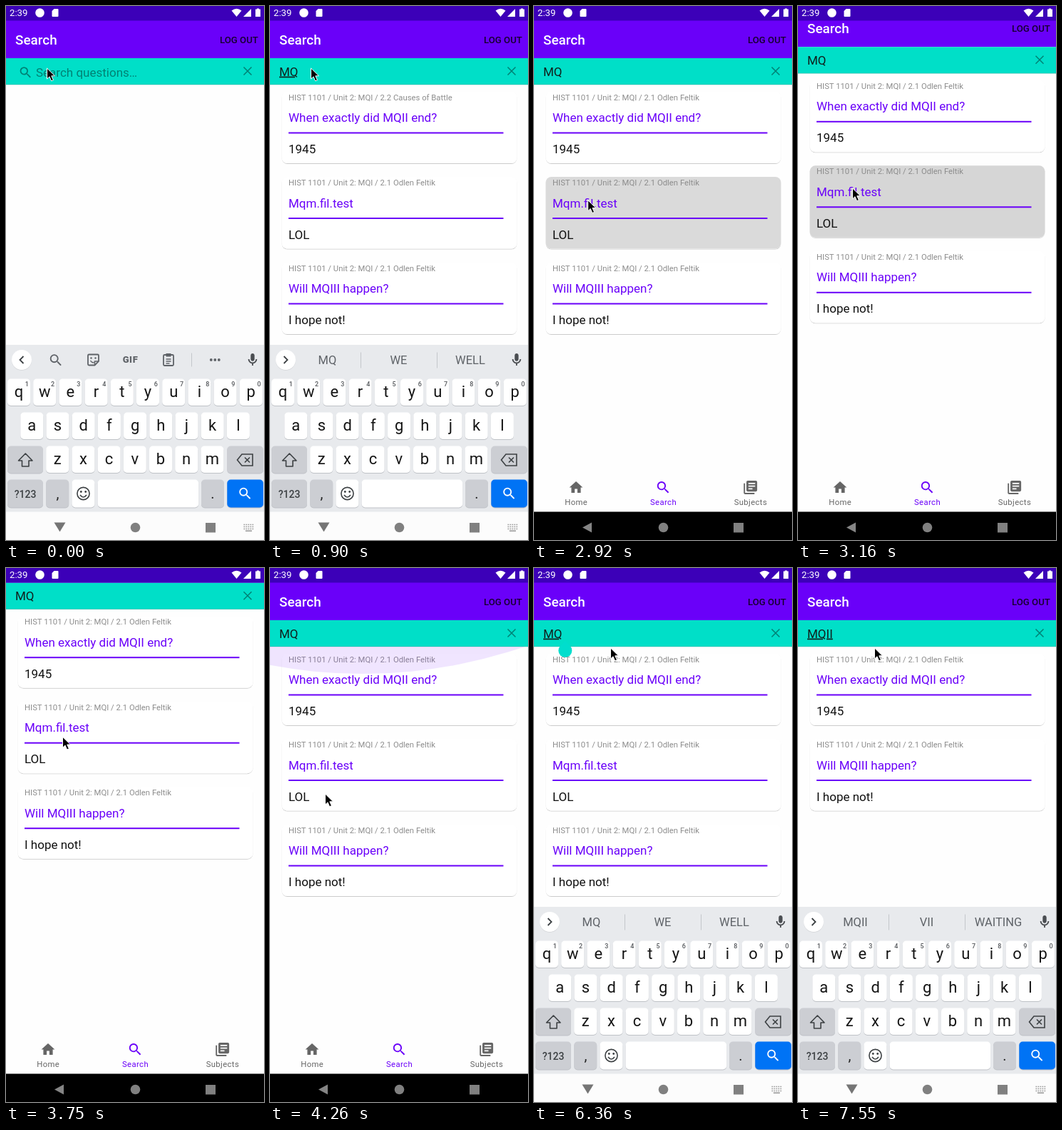
Animation of 362 by 747 pixels, one loop 8 s. Source, as an HTML page:

```html
<!DOCTYPE html>
<html lang="en">
<head>
<meta charset="utf-8">
<title>Question search</title>
<style>
  html, body { margin: 0; width: 100%; height: 100%; overflow: hidden; background: #fefefe; }
  svg { display: block; width: 362px; height: 747px; }
  text { font-family: Roboto, Arial, sans-serif; white-space: pre; }
</style>
</head>
<body>
<svg id="stage" viewBox="0 0 362 747" xmlns="http://www.w3.org/2000/svg"></svg>
<script>
const LOOP = 8000;
const PURPLE = '#6a00f9', TEAL = '#00dfc8', GREY = '#5f6368';

const PATHS = {
  search: 'M15.5 14h-.79l-.28-.27A6.47 6.47 0 0 0 16 9.5 6.5 6.5 0 1 0 9.5 16c1.61 0 3.09-.59 4.23-1.57l.27.28v.79l5 4.99L20.49 19l-4.99-5zm-6 0C7.01 14 5 11.99 5 9.5S7.01 5 9.5 5 14 7.01 14 9.5 11.99 14 9.5 14z',
  home: 'M10 20v-6h4v6h5v-8h3L12 3 2 12h3v8z',
  books: 'M4 6H2v14c0 1.1.9 2 2 2h14v-2H4V6zm16-4H8c-1.1 0-2 .9-2 2v12c0 1.1.9 2 2 2h12c1.1 0 2-.9 2-2V4c0-1.1-.9-2-2-2zm-1 9H9V9h10v2zm-4 4H9v-2h6v2zm4-8H9V5h10v2z',
  mic: 'M12 14c1.66 0 3-1.34 3-3V5c0-1.66-1.34-3-3-3S9 3.34 9 5v6c0 1.66 1.34 3 3 3zm5-3c0 2.76-2.24 5-5 5s-5-2.24-5-5H5c0 3.53 2.61 6.43 6 6.92V21h2v-3.08c3.39-.49 6-3.39 6-6.92h-2z'
};

// markup helpers
const text = (s, x, y, size, fill, extra = '') =>
  `<text x="${x}" y="${y}" font-size="${size}" fill="${fill}" ${extra}>${s}</text>`;
const mid = 'text-anchor="middle"';
const rect = (x, y, w, h, fill, extra = '') =>
  `<rect x="${x}" y="${y}" width="${w}" height="${h}" fill="${fill}" ${extra}/>`;
const disc = (x, y, r, fill, extra = '') => `<circle cx="${x}" cy="${y}" r="${r}" fill="${fill}" ${extra}/>`;
const path = (d, fill, extra = '') => `<path d="${d}" fill="${fill}" ${extra}/>`;
const line = (d, color, w) => path(d, 'none', `stroke="${color}" stroke-width="${w}"`);
const icon = (name, x, y, size, fill) =>
  path(PATHS[name], fill, `transform="translate(${x - size / 2} ${y - size / 2}) scale(${size / 24})"`);
const group = (id, body, extra = '') => `<g id="${id}" ${extra}>${body}</g>`;

const card = i => {
  const top = 119.5 + 119.5 * i;
  return group('card' + i,
    rect(16.5, top, 330, 100.5, '#fff', 'rx="8" filter="url(#lift)"') +
    rect(16.5, top, 330, 100.5, '#d6d6d6', `id="press${i}" rx="8" opacity="0"`) +
    `<g>${text('', 26, top + 12, 11.3, '#8c8c8c', `id="crumb${i}"`)}` +
    text('', 26, top + 42.5, 17, PURPLE, `id="ask${i}"`) +
    rect(26, top + 57, 301.5, 2, PURPLE) +
    text('', 26, top + 86.5, 17, '#111', `id="reply${i}"`) + '</g>');
};

const key = (x, y, w, h, fill) =>
  rect(x, y + 1, w, h, '#bfc2c7', 'rx="5"') + rect(x, y, w, h, fill, 'rx="5"');

function keys() {
  let s = '';
  const row = (letters, x0, y, base) => [...letters].forEach((c, i) => {
    const x = x0 + 36.2 * i;
    s += key(x, y, 32, 37.5, '#fff') + text(c, x + 16, base, 22, '#151515', mid);
    if (letters.length === 10)
      s += text((i + 1) % 10, x + 27.3, 531.5, 9, '#55585c', mid + ' font-weight="500"');
  });
  row('qwertyuiop', 2, 521.5, 546.5);
  row('asdfghjkl', 20.3, 568.5, 593.5);
  row('zxcvbnm', 56.2, 615.5, 640.8);
  const dark = '#ccced3';
  s += key(2, 615.5, 50, 38, dark) + key(310.3, 615.5, 50.7, 38, dark);
  s += path('M27.3 626L37 636h-5v8h-9.500v-8h-5z', 'none', 'id="shift" stroke="#3c4043" stroke-width="1.6" stroke-linejoin="round"');
  s += line('M324.500 635l6.500-8h15v16h-15zM335 631.500l7 7M342 631.500l-7 7', '#3c4043', 1.6);
  s += key(2, 662.5, 50, 39, dark) + text('?123', 27, 687.5, 14, '#3c4043', mid + ' font-weight="500"');
  s += key(56.2, 662.5, 32, 39, dark) + text(',', 72.5, 689, 20, '#222', mid);
  s += key(92.4, 662.5, 32, 39, '#fff') + disc(108.5, 682, 8.6, 'none', 'stroke="#3c4043" stroke-width="1.6"');
  s += disc(105.3, 679.5, 1.4, '#3c4043') + disc(111.7, 679.5, 1.4, '#3c4043');
  s += line('M104 684Q108.500 690 113 684', '#3c4043', 1.6);
  s += key(128.6, 662.5, 141.5, 39, '#fff');
  s += key(274, 662.5, 32, 39, dark) + text('.', 290, 689, 20, '#222', mid);
  s += key(310.3, 662.5, 50.7, 39, '#0073f5') + icon('search', 335.5, 682, 22, '#fff');
  return s;
}

function tools() {
  const clip = rect(221, 488, 14, 15, 'none', `rx="1.500" stroke="${GREY}" stroke-width="1.8"`);
  return line('M24.500 490l-5 5 5 5', '#3c4043', 1.8) + icon('search', 70, 495.5, 22, GREY) +
    path('M116.500 487.500h12q1.500 0 1.500 1.500v8l-5.500 5.500h-8q-1.500 0-1.500-1.500v-12q0-1.500 1.500-1.500z', 'none', `stroke="${GREY}" stroke-width="1.8"`) +
    disc(119.5, 492.5, 1.2, GREY) + disc(125.5, 492.5, 1.2, GREY) + line('M118.500 496q2 3.500 5 2.500M124.500 502v-5h5', GREY, 1.5) +
    text('GIF', 174.5, 499.3, 13, GREY, mid + ' font-weight="900" letter-spacing=".6"') +
    clip + rect(224.5, 486, 7, 4.5, GREY) + line('M224.500 494h7M224.500 497h7M224.500 500h5', GREY, 1.3) +
    rect(260, 485.5, 1, 19, '#c4c7cb') + [287.8, 293.3, 298.8].map(x => disc(x, 495, 1.9, GREY)).join('');
}

function words() {
  return line('M19.500 490l5 5-5 5', '#3c4043', 1.8) + rect(127, 484.5, 1, 22, '#c4c7cb') + rect(234, 484.5, 1, 22, '#c4c7cb') +
    [80.5, 180.5, 281].map((x, i) => text('', x, 501.3, 16.5, GREY, `id="word${i}" ${mid}`)).join('');
}

const tab = (name, label, x, fill) =>
  icon(name, x, 673.5, 22.6, fill) + text(label, x + .2, 697.5, 11.3, fill, mid + ' letter-spacing=".38"');

document.getElementById('stage').innerHTML = `<defs>
  <filter id="lift" x="-5%" y="-5%" width="110%" height="115%">
    <feDropShadow dx="0" dy=".9" stdDeviation=".7" flood-color="#000" flood-opacity=".22"/></filter>
  <clipPath id="below"><rect y="110" width="362" height="600"/></clipPath>
  <clipPath id="aboveNav"><rect width="362" height="708"/></clipPath></defs>` +
  rect(0, 0, 362, 747, '#fefefe') +
  group('list', card(0) + card(1) + card(2)) +
  `<g clip-path="url(#below)">${disc(130, 0, 700, PURPLE, 'id="glow" opacity=".1"')}</g>` +
  group('bars',
    rect(0, 20, 362, 53, PURPLE) +
    text('Search', 13, 54, 18.9, '#fff', 'font-weight="500"') +
    text('LOG OUT', 300, 52, 13.2, '#16002f', 'font-weight="500"') +
    rect(0, 73, 362, 37, TEAL) + rect(0, 109.5, 362, 1, '#000', 'opacity=".14"') +
    group('hint', icon('search', 27.5, 93, 21, 'rgba(0,0,0,.42)') +
      text('Search questions…', 42, 99, 17, 'rgba(0,0,0,.42)')) +
    text('', 13, 97.6, 17, '#10201e', 'id="query"') +
    line('M333.500 85.500l11 11M344.500 85.500l-11 11', 'rgba(0,0,0,.42)', 1.5)) +
  rect(0, 0, 362, 20.5, '#3c00b8') + text('2:39', 5, 14, 13.2, '#fff') + disc(47.5, 9.5, 6.3, '#fff') +
  path('M67.500 4h5q1 0 1 1v9q0 1-1 1h-7q-1 0-1-1v-7z', '#fff') +
  path('M316.500 6.500Q323.500 1 330.500 6.500L323.500 15z', '#fff') + path('M344 4v11h-11z', '#fff') +
  path('M352 3.500h3v1h2v10.500h-7v-10.500h2z', '#fff') +
  rect(0, 655, 362, 53, '#fefefe') + tab('home', 'Home', 59, '#666') +
  tab('search', 'Search', 181.3, PURPLE) + tab('books', 'Subjects', 303.7, '#666') +
  `<g clip-path="url(#aboveNav)">` + group('board',
    rect(0, 474, 362, 235, '#e8eaed') + disc(22, 495.8, 14, '#cfd1d5') + disc(22, 495, 14, '#fff') +
    group('tools', tools()) + group('words', words()) + icon('mic', 346, 495, 21.5, '#4a4d51') + keys()) + '</g>' +
  rect(0, 707.5, 362, 39.5, '#000', 'id="nav"') +
  path('M67.500 722.500h16l-8 13z', '#757575', 'id="down"') + path('M81 722.500v14l-13-7z', '#858585', 'id="back"') +
  disc(181.5, 729.5, 6.8, '#808080') + rect(280, 723, 14, 13.5, '#808080') +
  group('mini', [725.5, 728.5, 731.5].map(y => line(`M333.500 ${y}h14`, '#999', 1.7).replace('/>', ' stroke-dasharray="1.700 1.300"/>')).join('') +
    rect(336, 733.5, 9, 1.6, '#999')) +
  group('handle', disc(43.8, 115.5, 9.5, '#00decd') + path('M43.800 102l6.800 6.800h-13.600z', '#00decd')) +
  path('M0 0v15l3.500-3.200 2.600 6 2.800-1.200-2.600-5.800h4.700z', '#000', 'id="mouse" stroke="#fff" stroke-width="1" stroke-linejoin="round"');

const $ = {};
document.querySelectorAll('[id]').forEach(el => $[el.id] = el);

// timelines: [ms, value...]
const MOUSE = [[2389, 57.5, 87], [2390, 58.5, 108], [2700, 74, 262], [2860, 75.5, 276], [3160, 76.5, 255],
  [3400, 79, 226], [3600, 79.5, 224], [3750, 79.5, 236], [3970, 78.5, 290], [4260, 77.5, 316], [4380, 77.5, 316],
  [4790, 66, 79], [4850, 68, 76], [5020, 72, 69], [5220, 60, 68], [5420, 45, 81], [5610, 49.5, 87],
  [6080, 49.5, 87], [6360, 107.5, 112]];
const SCROLL = [[2960, 0], [3160, 15.5], [3340, 52.3], [3755, 52.3], [3965, 0]];
const BOARD = [[2700, 0], [2900, 235], [6080, 235], [6340, 0]];
const PRESS = [[2780, 0], [2940, 1], [3170, 1], [3380, 0]];
const GLOW = [[3970, 0], [4240, 1], [4380, 1], [4720, 0]];
const QUERY = [[0, ''], [500, 'M', ''], [690, 'MQ', ''], [2800, '', 'MQ'], [6200, 'MQ', ''],
  [7140, 'MQI', ''], [7370, 'MQI', 'I'], [7550, 'MQII', '']];
const WORDS = [[0], [560, 'M', 'WE', 'WELL'], [760, 'MQ', 'WE', 'WELL'], [7200, 'MQI', 'WI', 'WITH'],
  [7550, 'MQII', 'VII', 'WAITING']];

const CRUMB = 'HIST 1101 / Unit 2: MQI / 2.1 Odlen Feltik';
const END = ['When exactly did MQII end?', '1945'];
const SITE = ['Mqm.fil.test', 'LOL'];
const NEXT = ['Will MQIII happen?', 'I hope not!'];
const RESULTS = [[0], [640, END, SITE, NEXT], [7260, END, NEXT]];

const step = (table, t) => table.filter(r => r[0] <= t).pop().slice(1);
function tween(table, t) {
  const i = table.findIndex(r => r[0] > t);
  if (i < 0) return table[table.length - 1].slice(1);
  if (i === 0) return table[0].slice(1);
  const a = table[i - 1], b = table[i], k = (t - a[0]) / (b[0] - a[0]);
  return a.slice(1).map((v, j) => v + (b[j + 1] - v) * k);
}
const show = (el, on) => el.setAttribute('visibility', on ? 'visible' : 'hidden');
const move = (el, x, y) => el.setAttribute('transform', `translate(${x} ${y})`);
const say = (el, s) => { if (el.textContent !== s) el.textContent = s; };

let typed = null;
function render(t) {
  move($.mouse, ...tween(MOUSE, t));
  const [scroll] = tween(SCROLL, t);
  move($.list, 0, -scroll);
  move($.bars, 0, -scroll);

  const [under = '', plain = ''] = step(QUERY, t);
  if (typed !== under + '|' + plain) {
    typed = under + '|' + plain;
    $.query.innerHTML = `<tspan text-decoration="underline">${under}</tspan><tspan>${plain}</tspan>`;
  }
  show($.hint, t < 500);

  const found = step(RESULTS, t);
  for (let i = 0; i < 3; i++) {
    $['card' + i].style.display = found[i] ? '' : 'none';
    if (!found[i]) continue;
    say($['ask' + i], found[i][0]);
    say($['reply' + i], found[i][1]);
    say($['crumb' + i], i === 0 && t < 1250 ? CRUMB.replace('2.1 Odlen Feltik', '2.2 Causes of Battle') : CRUMB);
  }
  $.press1.setAttribute('opacity', tween(PRESS, t)[0]);

  const [pull] = tween(GLOW, t);
  show($.glow, pull > 0);
  $.glow.setAttribute('cy', 110 + 38 * pull - 700);
  $.glow.setAttribute('opacity', .1 * Math.min(1, pull * 1.5));

  const [drop] = tween(BOARD, t);
  move($.board, 0, drop);
  const open = t < 2880 || t >= 6080;
  $.board.style.display = drop < 235 ? '' : 'none';
  const words = step(WORDS, t);
  $.tools.style.display = words.length ? 'none' : '';
  $.words.style.display = words.length ? '' : 'none';
  words.forEach((w, i) => say($['word' + i], w));
  $.shift.setAttribute('fill', t >= 500 && t < 900 ? '#3c4043' : 'none');

  $.nav.setAttribute('fill', open ? '#fcfcfc' : '#000');
  show($.down, open);
  show($.back, !open);
  show($.mini, t < 2880 || t >= 6020);
  show($.handle, t >= 6020 && t < 7140);
}

function tick() {
  render(performance.now() % LOOP);
  requestAnimationFrame(tick);
}
tick();
</script>
</body>
</html>
```
